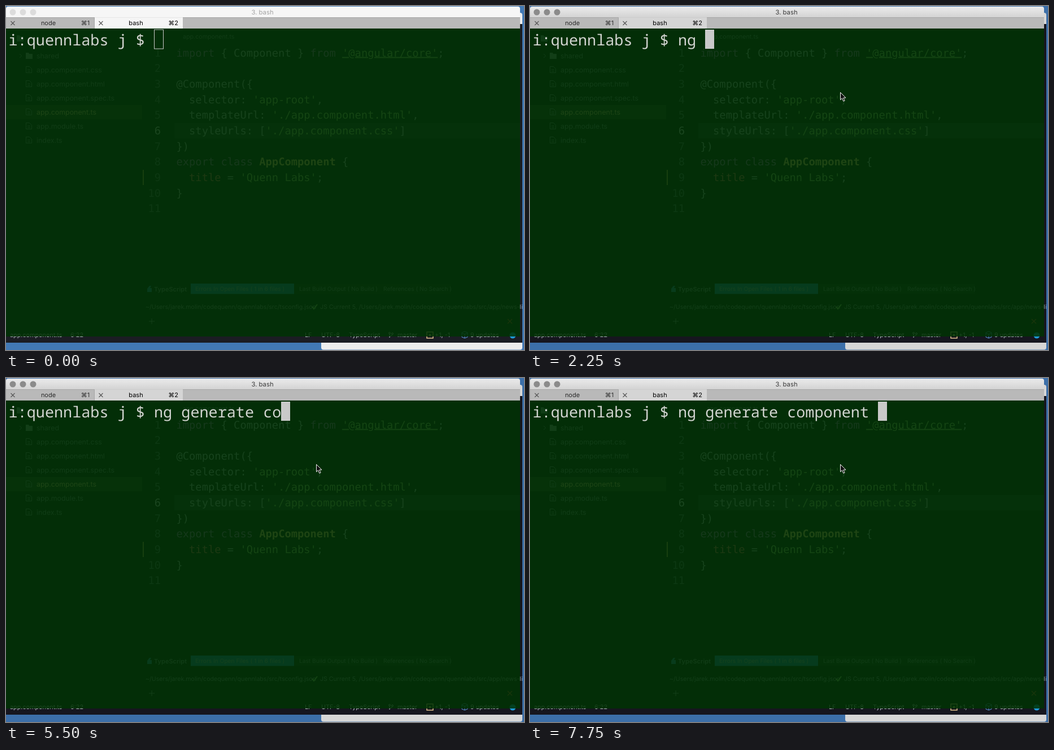
These frames come from a looping animation (917x611 px, 8 s). An HTML page:

```html
<!DOCTYPE html>
<html lang="en">
<head>
<meta charset="utf-8">
<title>Terminal over editor</title>
<style>
  html, body { margin: 0; width: 100%; height: 100%; overflow: hidden; background: #4279b5; }
  svg { display: block; width: 917px; height: 611px; }
  text { white-space: pre; text-rendering: geometricPrecision; font-family: Inter, "DejaVu Sans", sans-serif; }
  .mid { text-anchor: middle; }
  .code text { font: 18.75px "DejaVu Sans Mono", monospace; fill: #abb2bf; }
  .code .num { text-anchor: end; fill: #5b6273; }
  .code .now { fill: #c5cad3; }
  .key { fill: #a566ba; }
  .str { fill: #98c379; }
  .cls { fill: #e5c07b; font-weight: bold; }
  .var { fill: #e06c75; }
  .link { text-decoration: underline; }
  .files text { font-size: 12.4px; fill: #7b8290; }
  .files .open { fill: #e2c08d; }
  .icon { fill: none; stroke: #7b8290; }
  .panel text { font-size: 10.2px; fill: #7b8290; }
  .panel .path { font-size: 10.6px; fill: #8f96a3; }
  .panel .head { font-size: 11px; font-weight: 600; }
  .status text { font-size: 10.8px; fill: #c3c8d0; }
  .chrome text { font-size: 11px; fill: #2b2b2b; }
  .chrome .x { stroke: #555; stroke-width: 1.1; }
  .shell { font: 26.83px "Noto Sans Mono", monospace; fill: #d2d4d0; }

  /* window focus */
  .desk { fill: #3c6fa9; }
  .sheet { fill: #d6d6d6; }
  .base { fill: #16161f; }
  .bar { fill: url(#metal); }
  .dot { fill: #8b8b8b; }
  .chrome .title { font-size: 11.3px; fill: #3b3b3b; }
  .tab { fill: #d5d5d5; }
  .block { fill: #c9c9c9; }
  .blur .desk { fill: #4279b5; }
  .blur .sheet { fill: #ededed; }
  .blur .base { fill: #1b1d24; }
  .blur .bar { fill: #f6f6f6; }
  .blur .dot { fill: #dcdcdc; }
  .blur .title { fill: #a3a3a3; }
  .blur .tab { fill: #f5f5f5; }
  .blur .block { fill: none; stroke: #c9c9c9; }
</style>
</head>
<body>
<svg id="stage" viewBox="0 0 917 611">
  <defs>
    <linearGradient id="metal" x2="0" y2="1">
      <stop stop-color="#ebebeb"/><stop offset="1" stop-color="#d2d2d2"/>
    </linearGradient>
    <clipPath id="editorEdge"><rect y="32" width="914" height="566"/></clipPath>
  </defs>

  <rect class="desk" width="917" height="611"/>
  <rect class="sheet" x="558" y="580" width="356" height="30.5" rx="4"/>
  <rect class="sheet" x="880" y="12" width="34" height="30" rx="4"/>

  <g clip-path="url(#editorEdge)">
    <rect class="base" y="32" width="914" height="566"/>
    <g class="files" id="files">
      <rect y="176" width="241" height="25" fill="#2c3a2c"/>
      <path d="M19 52h5l1 2h6v9h-12z" fill="#7b8290"/>
      <path class="icon" d="M24 85l4 3.5-4 3.5"/>
      <path d="M35 83h5l1 2h6v9h-12z" fill="#8d949f"/>
    </g>
    <g class="code" id="code">
      <rect x="298" y="208" width="612" height="27" fill="#2a2f38"/>
      <rect x="242" y="291" width="2" height="27" fill="#b49a5a"/>
    </g>
    <g class="panel">
      <text x="313" y="57.5" style="font-size:10.7px">app.component.ts</text>
      <path d="M250 508v-6l4-5h3l-2 4h3v7z" fill="#3f7fc0"/>
      <text class="head" x="262" y="506.5">TypeScript</text>
      <rect x="327" y="493" width="183" height="18.5" fill="#3279c8"/>
      <text x="335" y="506" style="fill:#9fb3c4">Errors In Open Files ( 1 in 6 files )</text>
      <rect x="511" y="494" width="276" height="17" fill="#20242a"/>
      <text x="519" y="506">Last Build Output ( No Build )</text>
      <text x="668" y="506">References ( No Search )</text>
      <text class="path" x="247" y="538">~/Users/jarek.molin/codequenn/quennlabs/src/tsconfig.json</text>
      <path d="M542 534l3 4 6-8" fill="none" stroke="#98c379" stroke-width="2"/>
      <text class="path" x="556" y="538">JS Current 5, /Users/jarek.molin/codequenn/quennlabs/src/app/news-list/</text>
      <path d="M253 560h10M258 555v10" stroke="#8f96a3"/>
      <path d="M888 556l8 8m0-8l-8 8" stroke="#c84a3c" stroke-width="1.3"/>
    </g>
    <g class="status">
      <text x="7" y="588">app.component.ts</text>
      <text x="114" y="588">6:22</text>
      <text x="529" y="588">LF</text>
      <text x="558" y="588">UTF-8</text>
      <text x="607" y="588">TypeScript</text>
      <g fill="none" stroke="#c3c8d0">
        <circle cx="679" cy="581" r="1.5"/><circle cx="684" cy="582" r="1.5"/>
        <path d="M679 582v7M684 583q0 3-5 4"/>
      </g>
      <text x="693" y="588">master</text>
      <rect x="745" y="579" width="11" height="11" fill="none" stroke="#e2c08d" stroke-width="1.5"/>
      <circle cx="750.5" cy="584.5" r="2" fill="#e2c08d"/>
      <text x="759" y="588">+1, -1</text>
      <path d="M807 580l5-2 5 2v8l-5 2-5-2zM807 581l5 2 5-2M812 583v7" fill="none" stroke="#5a9ad8"/>
      <text x="822" y="588">9 updates</text>
      <circle cx="897" cy="585" r="5.5" fill="#1e9bd8"/>
    </g>
  </g>

  <rect y="40" width="910" height="547" fill="rgb(0,50,4)" fill-opacity=".87"/>

  <g class="chrome">
    <path class="bar" d="M0 21V5q0-4 4-4h902q4 0 4 4v16z"/>
    <circle class="dot" cx="12" cy="11" r="5.5"/>
    <circle class="dot" cx="30" cy="11" r="5.5"/>
    <circle class="dot" cx="48" cy="11" r="5.5"/>
    <text class="title mid" x="454" y="15">3. bash</text>
    <rect y="20.5" width="910" height="19.5" fill="#b9b9b9"/>
    <rect class="tab" x="157" y="20.5" width="156" height="19.5"/>
    <path d="M0 20.5h157M313 20.5h597M156.5 20v20" stroke="#a6a6a6"/>
    <path class="x" d="M8.500 27l7 7m0-7l-7 7M164.500 27l7 7m0-7l-7 7"/>
    <text class="mid" x="75" y="34">node</text>
    <text class="mid" x="140.500" y="34">⌘1</text>
    <text class="mid" x="230" y="34" style="fill:#000">bash</text>
    <text class="mid" x="296" y="34" style="fill:#000">⌘2</text>
  </g>

  <text class="shell" x="4.500" y="70">i:quennlabs j $</text>
  <text class="shell" id="typed" x="262" y="70"></text>
  <rect class="block" id="block" y="42" width="16" height="34"/>
  <path id="pointer" d="M.5.5v13.200l3-2.800 2.300 5.300 2.300-1-2.300-5.100h4.200z" fill="#111" stroke="#f2f2f2"/>
</svg>

<script>
  const $ = id => document.getElementById(id);
  const add = (id, markup) => $(id).insertAdjacentHTML('beforeend', markup);
  const paintAs = (cls, s) => `<tspan class="${cls}">${s}</tspan>`;
  const key = s => paintAs('key', s), str = s => paintAs('str', s);

  const source = [
    `${key('import')} { Component } ${key('from')} ${paintAs('str link', "'@angular/core'")};`,
    '',
    '@Component({',
    `  selector: ${str("'app-root'")},`,
    `  templateUrl: ${str("'./app.component.html'")},`,
    `  styleUrls: [${str("'./app.component.css'")}]`,
    '})',
    `${key('export class')} ${paintAs('cls', 'AppComponent')} {`,
    `  ${paintAs('var', 'title')} = ${str("'Quenn Labs'")};`,
    '}',
    ''
  ];
  source.forEach((line, i) => {
    const y = 89.5 + i * 27.67;
    add('code', `<text class="num ${i === 5 ? 'now' : ''}" x="274" y="${y}">${i + 1}</text>
      <text x="301.500" y="${y}">${line}</text>`);
  });

  const files = ['shared', 'app.component.css', 'app.component.html', 'app.component.spec.ts',
    'app.component.ts', 'app.module.ts', 'index.ts'];
  files.forEach((name, i) => {
    const y = 88 + i * 25;
    const open = name === 'app.component.ts' ? 'open' : '';
    add('files', `<text class="${open}" x="54" y="${y + 4.5}">${name}</text>`);
    if (i) add('files', `<path class="icon" d="M35.500 ${y - 5.5}h6l4 4v7h-10zM38 ${y}h5m-5 3h5"/>`);
  });

  const LOOP = 8000, CELL = 16.1;
  const command = 'ng generate component ';
  // one time per keystroke; two land together at 4250
  const strokes = [1500, 2000, 2250, 2750, 3000, 3250, 3500, 3750, 4250, 4250, 4500,
    4750, 5000, 5500, 5750, 6250, 6500, 6750, 7000, 7250, 7500, 7750];

  function draw(now) {
    const t = now % LOOP;
    const active = t >= 500;
    const count = strokes.filter(s => s <= t).length;
    $('stage').classList.toggle('blur', !active);
    $('typed').textContent = command.slice(0, count);
    $('block').setAttribute('x', Math.round(262 + count * CELL) + (active ? 0 : .5));
    $('pointer').setAttribute('visibility', t < 250 ? 'hidden' : 'visible');
    $('pointer').setAttribute('transform', active ? 'translate(549 153)' : 'translate(578 124)');
  }

  const start = performance.now();
  function tick() {
    draw(performance.now() - start);
    requestAnimationFrame(tick);
  }
  tick();
</script>
</body>
</html>
```
